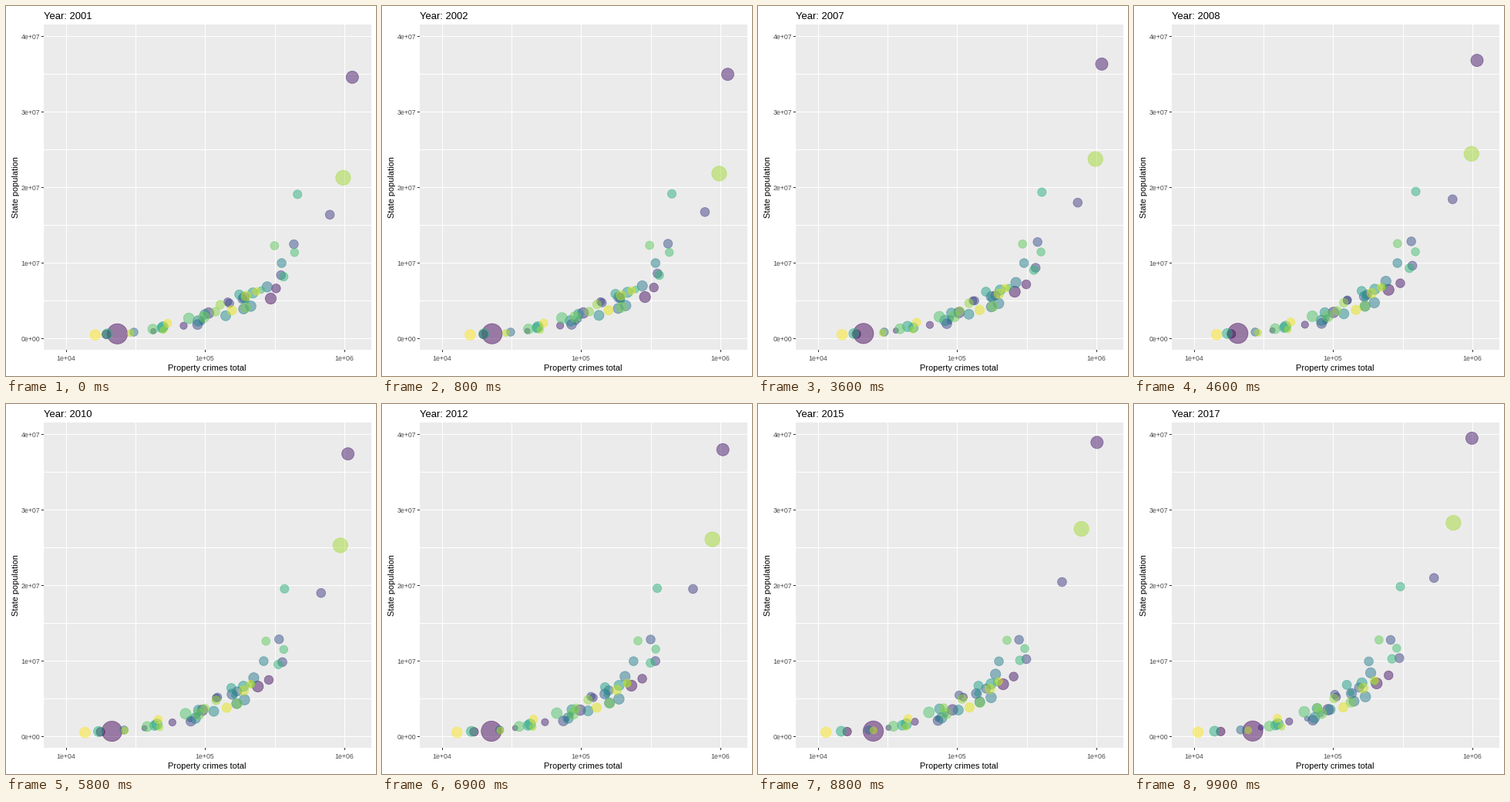
Animation, 480 px wide and 480 px high, one loop 10000 ms. Source, as a matplotlib script:

```python
import numpy as np
import matplotlib.pyplot as plt
from matplotlib.animation import FuncAnimation
from matplotlib.patches import Rectangle

plt.rcParams["font.family"] = "Liberation Sans"

SIZE, FRAMES, LOOP_MS = 480, 100, 10000
LEFT, TOP, RIGHT, BOTTOM = 49, 24, 474, 446
YEARS = np.arange(2001, 2018)
PROGRESS = np.linspace(0, 1, len(YEARS))

STATES = ("AL AK AZ AR CA CO CT DE DC FL GA HI ID IL IN IA KS KY LA ME MD MA MI MN MS MO "
          "MT NE NV NH NJ NM NY NC ND OH OK OR PA RI SC SD TN TX UT VT VA WA WV WI WY").split()

# Area (thousand sq mi), then population (millions) and crimes (thousands)
# at the start, middle and end of the period
KEY = {
    "AK": (590, (.63, .70, .74), (23.2, 20.3, 26.2)),
    "AZ": (114, (5.3, 6.55, 7.05), (294, 245, 204)),
    "CA": (159, (34.6, 37.0, 39.5), (1134, 1070, 987)),
    "FL": (59, (16.4, 18.6, 21.0), (782, 712, 527)),
    "GA": (59, (8.4, 9.75, 10.4), (348, 370, 297)),
    "IL": (56, (12.5, 12.9, 12.8), (431, 357, 257)),
    "MI": (58, (10, 10, 9.96), (352, 283, 179)),
    "NC": (53, (8.2, 9.4, 10.3), (364, 350, 263)),
    "NY": (50, (19.1, 19.5, 19.85), (458, 385, 302)),
    "OH": (41, (11.4, 11.5, 11.7), (436, 384, 284)),
    "PA": (45, (12.3, 12.6, 12.8), (313, 286, 212)),
    "TX": (267, (21.3, 24.7, 28.3), (975, 980, 727)),
    "WY": (98, (.49, .54, .58), (16.1, 14.3, 10.6)),
}


def through(points):
    return np.interp(PROGRESS, [0, 0.5, 1], points)


def build():
    """Yearly area, population and log10 crimes; smaller states follow a common rule."""
    rng = np.random.default_rng(7)
    rest = [s for s in STATES if s not in KEY]
    ranks = dict(zip(rest, rng.permutation(len(rest)) / (len(rest) - 1)))
    area, pop, crime = [], [], []
    for s in STATES:
        if s in KEY:
            size, people, crimes = KEY[s]
            area.append(size)
            pop.append(through(people))
            crime.append(3 + through(np.log10(crimes)))
            continue
        area.append(rng.uniform(1, 110))
        base = 0.55 + 6.3 * ranks[s] ** 1.2
        pop.append(base * (1 + rng.uniform(0.02, 0.25) * PROGRESS))
        rate = 0.037 * np.exp(np.clip(rng.normal(0, 0.17), -0.35, 0.3))
        fall = rng.uniform(0.05, 0.2) * PROGRESS ** 1.4
        wobble = rng.normal(0, 0.012, len(YEARS))
        crime.append(np.log10(base * 1e6 * rate) - fall + wobble)
    return np.array(area), np.array(pop).T, np.array(crime).T


AREA, POP, CRIME = build()
NY = STATES.index("NY")


def px(log_crime):
    return 78.5 + 180.45 * (log_crime - 4)


def py(millions):
    return 431.5 - 9.8 * millions


def radii():
    mm = 2 + 10 * np.sqrt(AREA / AREA.max())
    return 0.375 * (mm * 72.27 / 25.4 + 0.945)


def positions(year):
    k = min(int(year - YEARS[0]), len(YEARS) - 2)
    f = year - YEARS[k]
    x, y = ((1 - f) * a[k] + f * a[k + 1] for a in (CRIME, POP))
    spots = np.column_stack([px(x), py(y)])
    if 2014 < year < 2016:  # this state did not report
        spots[NY] = np.nan
    return spots


fig = plt.figure(figsize=(SIZE / 72, SIZE / 72), dpi=72, facecolor="white")
ax = fig.add_axes([0, 0, 1, 1])
ax.set(xlim=(0, SIZE), ylim=(SIZE, 0))
ax.axis("off")


def box(x, y, w, h, color, z=1):
    ax.add_patch(Rectangle((x, y), w, h, fc=color, lw=0, zorder=z))


def grid_x(log_crime):
    x = np.floor(px(log_crime))
    box(x, TOP, 1, BOTTOM - TOP, "white")
    return x


def grid_y(millions):
    y = np.floor(py(millions))
    box(LEFT, y, RIGHT - LEFT, 1, "white")
    return y


def label(x, y, text, size=8.8, color="#4D4D4D", **kw):
    return ax.text(x, y, text, size=size, color=color, **{"va": "baseline", **kw})


box(LEFT, TOP, RIGHT - LEFT, BOTTOM - TOP, "#EBEBEB", 0)
for v in (4, 4.5, 5, 5.5, 6):
    x = grid_x(v)
    if v == int(v):
        box(x, BOTTOM, 1, 3, "#333333")
        label(x, 460, f"1e+0{v}", ha="center")
for v in range(0, 45, 5):
    y = grid_y(v)
    if v % 10 == 0:
        box(LEFT - 3, y, 3, 1, "#333333")
        label(44, y + 4, f"{v // 10}e+07" if v else "0e+00", ha="right")

label(261, 473, "Property crimes total", 11, "black", ha="center")
label(18, 235, "State population", 11, "black", rotation=90, ha="right", va="center")
title = label(LEFT, 17, "", 13, "black", ha="left")

colors = plt.cm.viridis(np.linspace(0, 1, len(STATES)))
colors[:, 3] = 0.5
dots = ax.scatter(*positions(YEARS[0]).T, s=(2 * radii()) ** 2, facecolors=colors,
                  edgecolors=colors, linewidths=0.8, zorder=3)


def draw(i):
    year = YEARS[0] + (YEARS[-1] - YEARS[0]) * i / (FRAMES - 1)
    dots.set_offsets(positions(year))
    title.set_text(f"Year: {round(year)}")
    return dots, title


anim = FuncAnimation(fig, draw, frames=FRAMES, interval=LOOP_MS // FRAMES,
                     repeat=True, repeat_delay=0, blit=False)
plt.show()
```
